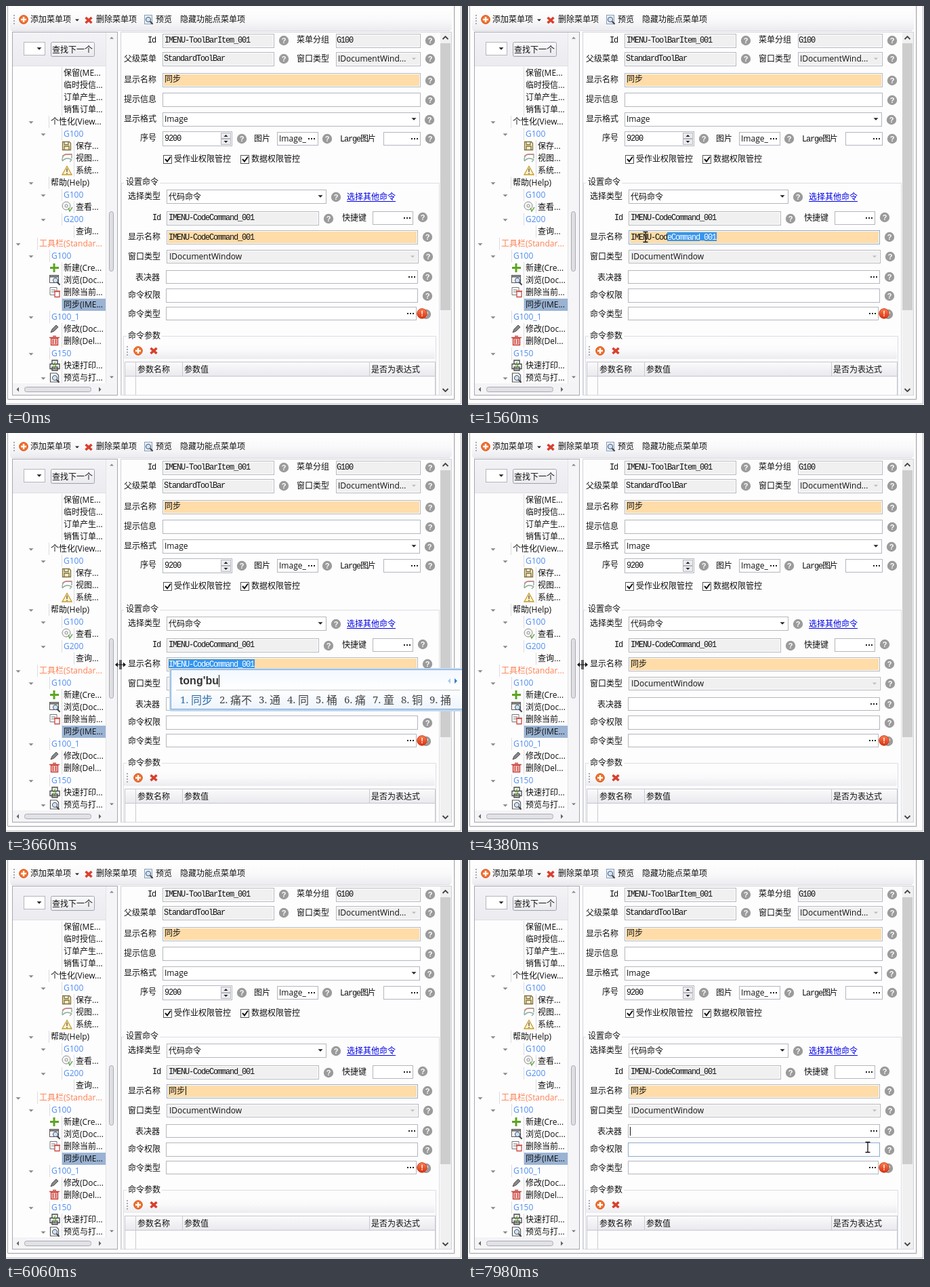
These frames come from a looping animation (673 by 589 pixels, 8 s). An HTML page:

```html
<!DOCTYPE html>
<html lang="zh-CN">
<head>
<meta charset="utf-8">
<title>菜单命令设置</title>
<style>
html, body { margin: 0; width: 100%; height: 100%; overflow: hidden; background: #fdfdfe; }
svg { display: block; }
text { font: 12px "Open Sans", "Noto Sans CJK SC", "Noto Sans CJK", sans-serif; fill: #111; white-space: pre; }
.mono { font-family: "Liberation Mono", "Noto Sans CJK SC", "Noto Sans CJK", monospace; letter-spacing: -1.2px; }
.blue { fill: #4f8df0; }
.root { fill: #ff7f50; }
.link { fill: #0000e6; }
.white { fill: #fff; }
.q { font: bold 11px "Liberation Sans", sans-serif; fill: #fff; text-anchor: middle; }
.pinyin { font: bold 16px "Liberation Sans", sans-serif; fill: #333; }
.cand { font: 300 16px "Noto Sans CJK SC", "Noto Sans CJK", sans-serif; fill: #444; }
.cand.first { fill: #2f6da8; }
.num { font-family: "Noto Serif", serif; font-size: 15px; }
</style>
</head>
<body>
<svg id="stage" width="673" height="589" viewBox="0 0 673 589"></svg>
<script>
const stage = document.getElementById("stage");
const EDGE = "#b4b7be", GREY = "#f0f0f1", PEACH = "#ffdca8";

const text = (x, y, s, cls = "") => `<text x="${x}" y="${y + 4.3}" class="${cls}">${s}</text>`;
const box = (x, y, r, b, fill, stroke = EDGE, rx = 0) =>
  `<rect x="${x + .5}" y="${y + .5}" width="${r - x - 1}" height="${b - y - 1}" rx="${rx}" fill="${fill}" stroke="${stroke}"/>`;
const fillBox = (x, y, r, b, fill, rx = 0) =>
  `<rect x="${x}" y="${y}" width="${r - x}" height="${b - y}" rx="${rx}" fill="${fill}"/>`;
const path = (d, stroke, w = 1, fill = "none") =>
  `<path d="${d}" stroke="${stroke}" stroke-width="${w}" fill="${fill}"/>`;
const disc = (x, y, r, fill, stroke = "none") => `<circle cx="${x}" cy="${y}" r="${r}" fill="${fill}" stroke="${stroke}"/>`;
const down = (x, y, c = "#222", s = 3.5) => path(`M${x - s} ${y - s / 2}h${2 * s}l${-s} ${s}z`, "none", 0, c);
const up = (x, y, c = "#222", s = 3.5) => path(`M${x - s} ${y + s / 2}h${2 * s}l${-s} ${-s}z`, "none", 0, c);
const side = (x, y, s, c) => path(`M${x} ${y - Math.abs(s)}v${2 * Math.abs(s)}l${s} ${-Math.abs(s)}z`, "none", 0, c);
const help = (x, y) => disc(x, y, 7.2, "#9b9b9b") + text(x, y - .3, "?", "q");
const dots = (x, y) => [-4, 0, 4].map(d => fillBox(x + d - 1, y - 1, x + d + 1, y + 1, "#222")).join("");
const grip = (x, y) => [0, 4, 8, 12].map(d => fillBox(x, y + d, x + 2, y + d + 2, "#a9abb3")).join("");
const addIcon = (x, y) => disc(x, y, 6.3, "#f0702a", "#d9531a") + path(`M${x - 4} ${y}h8M${x} ${y - 4}v8`, "#fff", 2.4);
const cross = (x, y) => path(`M${x - 4.5} ${y - 4}l9 8M${x + 4.5} ${y - 4}l-9 8`, "#d8402c", 3.6);
const lens = (x, y) => disc(x, y, 3.6, "#cfe2f8", "#456") + path(`M${x + 2.6} ${y + 2.8}l4 4`, "#444", 2);

function frame() {
  return path("M2.5 0V580.5H661.5V0", "#a9a9ad") + path("M0 587.5H671.5V0", "#b5b5b9")
    + path("M3 581.5H662.5V0", "#e6e6ea")
    + fillBox(6, 5, 658, 36, "url(#bar)", 3) + path("M8 36.5H655", "#dcdce2") + grip(11, 13)
    + addIcon(26, 20) + text(36, 20, "添加菜单项") + down(105, 21, "#222", 3)
    + cross(122, 21) + text(133, 20, "删除菜单项")
    + box(204, 13, 216, 27, "#e8f0fa", "#8a9db5") + lens(210, 20) + text(221, 20, "预览")
    + text(257, 20, "隐藏功能点菜单项");
}

const icons = {
  save: "M83.500 200.500h10l2 2v10h-12zM86 200.500v4h6v-4M86 212v-5h7v5",
  view: "M83 228q0-8 5-9h9v6M83 229q6-7 14-2l-3 3"
};
function treeIcons() {
  return path(icons.save, "#80713c", 1.3, "#f6edc8")
    + path(icons.view, "#8a9", 1.4) + path("M83 222q4-4 14-3", "#d08080", 1.5)
    + path("M90 236.500l7 12.500h-14z", "#c79a2c", 1.3, "#fff3c4") + path("M90 240v5M90 246.500v1.500", "#555", 1.4)
    + disc(89, 295, 6, "#f4f4f4", "#8c8c8c") + disc(89, 295, 2, "#fff", "#888") + path("M92 298l2 5 4-6", "#6aa84f", 1.5)
    + path("M71 380v13M65 386.500h13", "#5da522", 3)
    + box(64, 397, 78, 409, "#fff", "#555") + path("M64 399.500h14", "#555", 2) + lens(73, 405)
    + path("M65 415.500h10v11h-10zM67 419h6M67 422h6", "#777", 1, "#fff") + path("M72 421.500h7v8h-7zM71 421h9", "#c94a42", 1.3, "#fff")
    + path("M66 482l2-5 6-6 3 3-6 6z", "#555", 1, "#888")
    + path("M66.500 490.500h10v10h-10zM64 489.500h15M69 487.500h5M69.500 492v7M73.500 492v7", "#c9433d", 1.4, "#f4c7c4")
    + path("M65 528.500h14v7h-14zM68 528v-5h8v5M68 533h8v5h-8z", "#444", 1.3, "#fff") + path("M73 525l-3 5h4l-3 5", "#54a02c", 1.2)
    + path("M65.500 542h9l3 3v10h-12z", "#555", 1.2, "#fff") + lens(72, 549);
}

// Each row: text x, label, class, expander x
const rows = [
  [85, "保留(ME..."], [85, "临时授信..."], [85, "订单产生..."], [85, "销售订单..."],
  [66, "个性化(View...", "", 37], [85, "G100", "blue", 55], [103, "保存..."], [103, "视图..."], [103, "系统..."],
  [66, "帮助(Help)", "", 37], [85, "G100", "blue", 55], [103, "查看..."], [85, "G200", "blue", 55], [103, "查询..."],
  [49, "工具栏(Standar...", "root", 18], [67, "G100", "blue", 37], [85, "新建(Cre..."], [85, "浏览(Doc..."],
  [85, "删除当前..."], [85, "同步(IME..."], [67, "G100_1", "blue", 37], [85, "修改(Doc..."], [85, "删除(Del..."],
  [67, "G150", "blue", 37], [85, "快速打印..."], [85, "预览与打...", "", 55]
];

function tree() {
  let s = box(9, 38, 165, 575, "#fdfdfe", "#a6a8b0") + fillBox(10, 39, 147, 88, "url(#head)") + path("M10 88.500H147", "#dedee4")
    + box(26, 53, 58, 73, "#fff") + down(49, 63) + box(66, 53, 131, 75, "url(#btn)", "#9fa3ad", 2) + text(68, 65, "查找下一个");
  s += '<g clip-path="url(#treeClip)">' + fillBox(82, 432, 147, 450, "#9ab3d3");
  rows.forEach(([x, label, cls, arrow], i) => {
    const y = 99 + 18 * i;
    s += path(`M${x - 2.5} ${y - 9}v18`, "#dcdce0") + text(x, y, label, cls);
    if (arrow) s += down(arrow, y + 1, "#888", 3.5);
  });
  s += treeIcons() + "</g>";
  return s + fillBox(147, 39, 164, 557, "#f5f5f7") + path("M147.500 39V557", "#e3e3e8")
    + up(156, 47, "#888", 3) + down(156, 548, "#777", 3) + box(152, 303, 159, 392, "#dfdfe3", "#a9abb2", 3)
    + fillBox(10, 557, 164, 574, "#f4f4f6") + side(19, 566, -3.5, "#666") + side(137, 566, 3.5, "#666")
    + box(27, 562, 126, 570, "#e2e2e6", "#a9abb2", 3);
}

// Each field: x, y, right, bottom, fill
const fields = {
  id: [231, 41, 396, 62, GREY], group: [487, 41, 612, 62, GREY],
  parent: [231, 68, 396, 89, GREY], win: [487, 68, 612, 89, GREY],
  name: [231, 99, 612, 120, PEACH], tip: [231, 128, 612, 149, "#fff"],
  format: [231, 157, 611, 178, "#fff"], order: [231, 185, 334, 207, "#fff"],
  pic: [400, 186, 461, 206, "#fff"], large: [557, 186, 612, 206, "#fff"],
  kind: [237, 271, 473, 292, "#fff"], cmdId: [237, 303, 462, 324, GREY],
  key: [541, 303, 601, 323, "#fff"], cmdName: [237, 331, 608, 352, PEACH],
  cmdWin: [237, 360, 609, 380, GREY], judge: [236, 390, 608, 410, "#fff"],
  right: [236, 417, 608, 438, "#fff"], type: [236, 444, 606, 464, "#fff"]
};
// The fill sits inside a thin white margin
const field = ([x, y, r, b, fill]) => box(x, y, r, b, "#fff") + fillBox(x + 2, y + 2, r - 2, b - 2, fill);

function form() {
  const labels = [
    [209, 50, "Id", "mono"], [429, 50, "菜单分组"], [174, 78, "父级菜单"], [429, 78, "窗口类型"], [174, 109, "显示名称"],
    [174, 138, "提示信息"], [174, 167, "显示格式"], [198, 195, "序号"], [366, 196, "图片"], [493, 196, "Large图片", "mono"],
    [248, 226, "受作业权限管控"], [362, 226, "数据权限管控"], [177, 260, "设置命令"], [180, 281, "选择类型"],
    [216, 312, "Id", "mono"], [496, 313, "快捷键"], [180, 341, "显示名称"], [180, 370, "窗口类型"], [191, 401, "表决器"],
    [180, 427, "命令权限"], [180, 455, "命令类型"], [180, 487, "命令参数"],
    [234, 50, "IMENU-ToolBarItem_001", "mono"], [488, 50, "G100", "mono"], [233, 77, "StandardToolBar", "mono"],
    [490, 78, "IDocumentWind..."], [234, 108, "同步"], [234, 167, "Image"], [234, 195, "9200", "mono"], [403, 196, "Image_"],
    [240, 282, "代码命令"], [503, 282, "选择其他命令", "link"], [240, 312, "IMENU-CodeCommand_001", "mono"], [241, 370, "IDocumentWindow"]
  ];
  const helps = [[410, 51], [626, 51], [410, 78], [626, 78], [626, 110], [626, 139], [625, 168], [348, 196], [474, 196],
    [626, 196], [487, 282], [476, 314], [615, 312], [622, 341], [623, 370], [622, 400], [622, 428], [620, 455]];
  const check = x => box(x, 220, x + 13, 233, "#fff", "#555") + path(`M${x + 3} 226l3 3.500 5-7`, "#111", 2);
  let s = path("M169.500 575V38.500H657.500V575", "#d0d2d8") + path("M170 574.500H657", "#d8d9de")
    + path("M174 261.500H170.500V575M227 261.500H639.500V575", "#dcdde2")
    + path("M178 487.500H173.500V575M230 487.500H634.500V575", "#dcdde2");
  s += Object.values(fields).map(field).join("");
  s += labels.map(l => text(...l)).join("") + helps.map(h => help(...h)).join("");
  s += path("M503 288.500h72", "#0000e6") + check(232) + check(346)
    + down(602, 78, "#bbb", 3) + down(602, 167) + down(464, 281) + down(600, 370, "#bbb", 3)
    + box(317, 187, 332, 196, "#ececf0") + box(317, 196, 332, 205, "#ececf0") + up(324.5, 191.5, "#222", 3) + down(324.5, 200.5, "#222", 3)
    + [[451, 196], [603, 196], [592, 313], [599, 400], [597, 454]].map(d => dots(...d)).join("")
    + disc(614, 454, 7.3, "url(#err)", "#c9401a") + text(614, 454, "!", "q");
  s += fillBox(174, 497, 633, 521, "url(#bar)", 2) + grip(178, 502) + addIcon(195, 509) + cross(218, 509)
    + fillBox(175, 525, 633, 547, "url(#btn)") + path("M175.500 575V525.500H633.500V575M175 546.500H633", "#c4c6cd")
    + path("M191.500 525V574M260.500 525v22M536.500 525v22", "#c9cbd2")
    + text(194, 537, "参数名称") + text(263, 537, "参数值") + text(539, 537, "是否为表达式");
  return s + fillBox(641, 39, 657, 574, "#f0f0f1") + fillBox(641, 55, 656, 449, "#cdcdcd")
    + path("M644.500 49l4-4 4 4M644.500 565l4 4 4-4", "#444", 1.8);
}

const grad = (id, ...stops) => `<linearGradient id="${id}" x1="0" y1="0" x2="0" y2="1">`
  + stops.map((c, i) => `<stop offset="${i / (stops.length - 1)}" stop-color="${c}"/>`).join("") + "</linearGradient>";

stage.innerHTML = "<defs>" + grad("bar", "#fefefe", "#f9f9fb", "#ececf0") + grad("head", "#f3f3f6", "#ebebf0")
  + grad("btn", "#fbfbfc", "#e9e9ee") + grad("err", "#ff8050", "#d92f10") + grad("glass", "#f2f8ff", "#ffffff", "#edf4fc")
  + '<clipPath id="treeClip"><rect x="10" y="89" width="137" height="468"/></clipPath>'
  + '<clipPath id="selClip"><rect id="selRect" y="333" height="15"/></clipPath></defs>'
  + fillBox(0, 0, 673, 589, "#fdfdfe") + frame() + tree() + form()
  + '<g id="glow"></g><g id="old">' + text(240, 341, "IMENU-CodeCommand_001", "mono")
  + '<g clip-path="url(#selClip)">' + fillBox(240, 334, 367, 347, "#3595ee") + text(240, 341, "IMENU-CodeCommand_001", "mono white") + "</g></g>"
  + '<g id="done">' + text(240, 341, "同步") + '</g><rect id="caret" width="1" height="13"/><g id="ime"></g><g id="cursor">'
  + '<g id="arrow">' + path("M.5 .5v16l3.700-3.500 2.600 6 2.500-1.100-2.600-5.900h5z", "#111", 1, "#fff") + "</g>"
  + '<g id="beam">' + path("M-3.500-7.500h3l.5.500.5-.500h3M0-7v14M-3.500 7.500h3l.5-.500.5.500h3", "#111", 1.3) + "</g>"
  + '<g id="split">' + path("M-1 -7v14M1-7v14M-7 0h14", "#111", 1.2) + path("M-8 0l4-3.500v7zM8 0l-4-3.500v7z", "none", 0, "#111") + "</g></g>";

const $ = id => document.getElementById(id);
const show = (el, on) => el.setAttribute("visibility", on ? "inherit" : "hidden");

// Typed letters: start time, pinyin, candidates
const typing = [
  [2820, "t", "他 图 它 她 条 填 太 提 天"], [2940, "to", "头 投 透 偷 图 土 团 脱 托"],
  [3180, "ton", "同 通 痛 统 桶 童 铜 捅 筒"], [3300, "tong", "同 通 痛 统 桶 童 铜 捅 筒"],
  [3480, "tong'b", "同步 通报 通 同 桶 痛 童 铜 捅"], [3600, "tong'bu", "同步 痛不 通 同 桶 痛 童 铜 捅"], [3900, "", ""]
];
let shown = -2;
function drawIme(t) {
  const i = typing.findLastIndex(k => t >= k[0]);
  if (i === shown) return;
  shown = i;
  const ime = $("ime");
  if (i < 0 || !typing[i][1]) { ime.innerHTML = ""; return; }
  const [, word, list] = typing[i];
  let x = 257, cands = "";
  list.split(" ").forEach((c, n) => {
    const cls = "cand" + (n ? "" : " first");
    cands += `<text x="${x}" y="399" class="${cls} num">${n + 1}.</text><text x="${x + 16}" y="399.500" class="${cls}">${c}</text>`;
    x += 26 + 16 * c.length;
    if (!n && i === 0) {
      cands += box(290, 386, 297, 393, "#e8f2fc", "#6fa3d8", 1) + path("M291.500 389.500h4M293.500 387.500v4", "#4d88c4");
      x += 9;
    }
  });
  const right = Math.max(664, x + 13);
  ime.innerHTML = box(241, 347, right + 1, 411, "#b9d3ee", "#c6d9ec", 2) + box(243, 349, right - 1, 408, "url(#glass)", "#86aedb")
    + `<text x="256" y="371" class="pinyin">${word}</text>` + path(`M251 379.500H${right - 10}`, "#c2c6cc") + cands
    + side(right - 24, 366, -4, "#a9c9ec") + side(right - 18, 366, 4, "#3b7fc4");
  const end = Math.round(256 + ime.querySelector(".pinyin").getComputedTextLength());
  ime.insertAdjacentHTML("beforeend", fillBox(end, 357, end + 1, 375, "#222"));
}

// Pointer legs: runs of [time, x, y]; hidden between legs
const legs = [
  [[240, 626, 60], [420, 560, 110], [600, 470, 210], [780, 400, 320], [900, 372, 363], [1020, 367, 341], [1140, 367, 341],
    [1500, 296, 341], [1560, 262, 341], [1740, 169, 342], [4800, 169, 342], [4920, 330, 318], [5040, 590, 268], [5100, 645, 250]],
  [[6900, 485, 304], [7020, 470, 325], [7200, 400, 372], [7380, 325, 400], [7560, 308, 408], [7620, 308, 411],
    [7800, 308, 411], [7860, 400, 416], [7920, 520, 422], [7980, 590, 424], [8000, 590, 424]]
];
function pointer(t) {
  const leg = legs.find(l => t >= l[0][0] && t < l.at(-1)[0]);
  if (!leg) return null;
  const i = leg.findIndex(p => p[0] > t), a = leg[i - 1], b = leg[i];
  const k = (t - a[0]) / (b[0] - a[0]);
  return [a[1] + (b[1] - a[1]) * k, a[2] + (b[2] - a[2]) * k];
}

const glows = [["name", 360, 480], ["tip", 420, 540], ["cmdWin", 840, 960], ["cmdName", 960, 1560], ["cmdId", 5280, 5400],
  ["cmdName", 5940, 6000], ["cmdId", 6960, 7020], ["cmdName", 7020, 7140], ["cmdWin", 7140, 7260], ["judge", 7320, 7500], ["right", 7860, 8000]];
const carets = [[2460, 2820, 240, 334, "#fff"], [3900, 4380, 265, 334], [4860, 5400, 265, 334], [5940, 6120, 265, 334], [7500, 8000, 239, 394]];
const inField = (x, y) => Object.values(fields).some(f => x > f[0] && x < f[2] && y > f[1] && y < f[3] + 2);

function draw(now) {
  const t = Math.floor((now % 8000) / 60 + 1e-6) * 60;
  const p = pointer(t);
  show($("cursor"), p);
  if (p) {
    const [x, y] = p.map(Math.round);
    const kind = t >= 1920 && t <= 4800 ? "split" : t >= 1140 && t < 1920 || inField(x, y) ? "beam" : "arrow";
    $("cursor").setAttribute("transform", `translate(${x} ${y})`);
    for (const k of ["arrow", "beam", "split"]) show($(k), k === kind);
  }
  $("glow").innerHTML = glows.map(([id, on, off]) => {
    const a = t < on ? 0 : t < off ? 1 : Math.max(0, 1 - (t - off) / 180);
    return a ? `<g opacity="${a}">${box(...fields[id].slice(0, 4), "none", "#8fabca")}</g>` : "";
  }).join("");
  show($("old"), t < 3900);
  show($("done"), t >= 3900);
  const drag = t >= 1200 && t < 3900 ? pointer(t - 60)[0] : 367;
  const left = Math.max(240, 240 + 6 * Math.floor((drag - 240) / 6));
  $("selRect").setAttribute("x", left);
  $("selRect").setAttribute("width", t < 1200 ? 0 : Math.max(0, 367 - left));
  const c = carets.find(k => t >= k[0] && t < k[1]);
  show($("caret"), c);
  if (c) {
    $("caret").setAttribute("x", c[2]);
    $("caret").setAttribute("y", c[3]);
    $("caret").setAttribute("fill", c[4] || "#111");
  }
  drawIme(t);
}

const start = performance.now();
function tick() {
  draw(performance.now() - start);
  requestAnimationFrame(tick);
}
tick();
</script>
</body>
</html>
```
